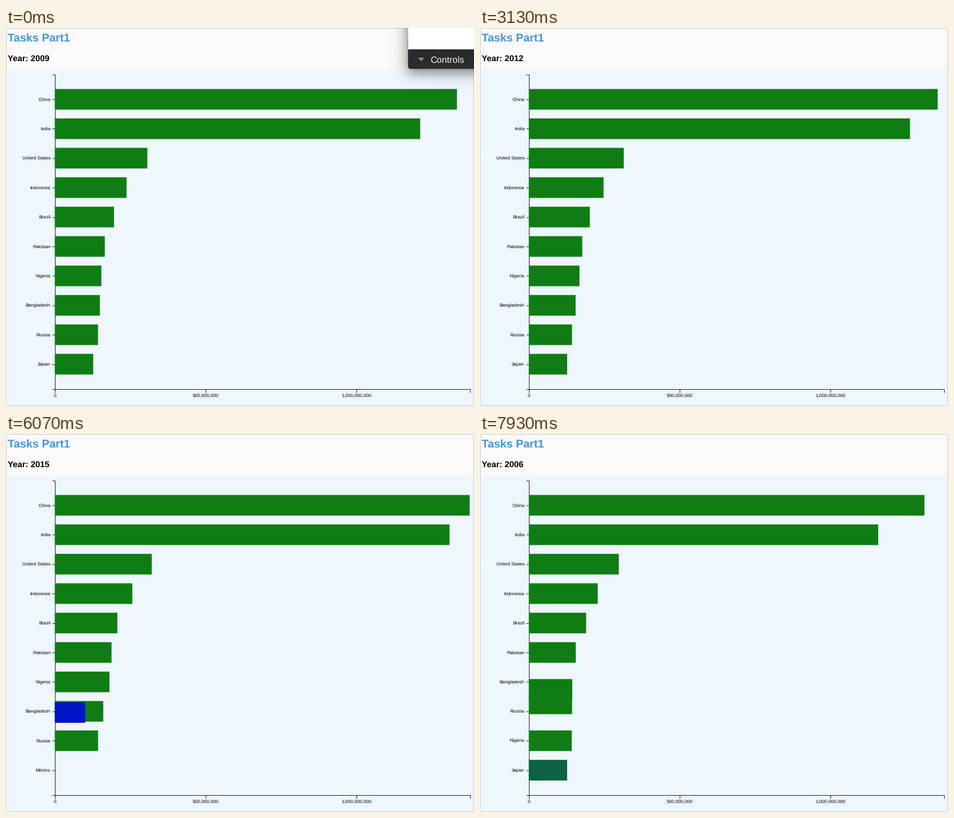
A matplotlib script for the animation above (8000 ms loop, 832 px wide and 673 px high).

```python
import math

import matplotlib.pyplot as plt
import numpy as np
from matplotlib.animation import FuncAnimation
from matplotlib.patches import FancyBboxPatch, Polygon, Rectangle

W, H, DPI = 832, 673, 64
FRAMES, INTERVAL = 200, 40
STEPS_PER_S = 15

X0, SCALE = 86.7, 0.5366          # zero of the x axis, pixels per million
TOP, BOTTOM, RIGHT = 83, 643.4, 825.2
ROW0, PITCH, BAR_H = 108.6, 52.4, 36.7
FIRST_TICK, EASE_S = 0.797, 0.434
FIRST_YEAR, YEARS = 2005, 11

GREEN = np.array([15, 125, 20]) / 255
BLUE = np.array([2, 20, 200]) / 255
INK = "#1c1c1c"

# millions of people in 2005, 2010 and 2015
PEOPLE = {
    "China": (1305.6, 1341.0, 1376.05),
    "India": (1144.3, 1231.0, 1311.05),
    "United States": (296.1, 309.9, 321.8),
    "Indonesia": (226.3, 241.6, 257.6),
    "Brazil": (188.5, 198.6, 207.8),
    "Pakistan": (153.4, 170.0, 188.9),
    "Nigeria": (139.6, 159.4, 182.2),
    "Bangladesh": (142.9, 151.6, 161.0),
    "Russia": (143.6, 143.2, 143.5),
    "Japan": (127.0, 127.3, 126.6),
    "Mexico": (108.5, 118.6, 127.0),
}


def people(name, year):
    a, b, c = PEOPLE[name]
    s = (year - 2010) / 5
    return b + s * (c - a) / 2 + s * s * (a + c - 2 * b) / 2


def ranking(year):
    return sorted(PEOPLE, key=lambda name: -people(name, year))[:10]


def year_before(year):
    return FIRST_YEAR + (year - FIRST_YEAR - 1) % YEARS


def bounce(u):
    k = 7.5625
    if u < 4 / 11:
        return k * u * u
    if u < 8 / 11:
        return k * (u - 6 / 11) ** 2 + 0.75
    if u < 10 / 11:
        return k * (u - 9 / 11) ** 2 + 0.9375
    return k * (u - 21 / 22) ** 2 + 0.984375


def row_y(row):
    return ROW0 + PITCH * row


plt.rcParams["font.family"] = "Liberation Sans"
plt.rcParams["text.hinting"] = "none"

fig = plt.figure(figsize=(W / DPI, H / DPI), dpi=DPI, facecolor="#fbfaf8")
ax = fig.add_axes([0, 0, 1, 1])


def pt(px):
    return px * 72 / DPI


def label(x, y, text, px, color="black", **kw):
    return ax.text(x, y, text, fontsize=pt(px), color=color,
                   va="baseline", **kw)


def line(xs, ys, color=INK):
    ax.plot(xs, ys, color=color, lw=pt(1), solid_capstyle="butt",
            solid_joinstyle="miter", zorder=2)


def box(x, y, w, h, color, z, **kw):
    return ax.add_patch(Rectangle((x, y), w, h, fc=color, lw=0, zorder=z, **kw))


# page
box(3, 74, W - 3, H - 74, "#eef6fe", 0)
ax.add_patch(FancyBboxPatch((0.5, 0.5), W - 1, H - 1, fc="none", ec="#c6c8ca",
                            boxstyle="round,pad=0,rounding_size=4",
                            lw=pt(1), zorder=1))
label(2.8, 24.2, "Tasks Part1", 20, "#4394db", weight="bold")
year_text = label(2.8, 59, "", 15, weight="bold")

# axes
line([81.5, X0, X0, 81.5], [TOP, TOP, BOTTOM, BOTTOM])
line([X0, X0, RIGHT, RIGHT], [648.5, BOTTOM, BOTTOM, 648.5])
for value in (0, 500, 1000):
    x = X0 + value * SCALE
    line([x, x], [BOTTOM, 648.5])
    label(x, 656.5, f"{value * 10**6:,}", 8.35, ha="center")
row_texts = []
for row in range(10):
    y = row_y(row) + BAR_H / 2
    line([81.5, X0], [y, y])
    row_texts.append(label(79, y + 2.6, "", 8.35, ha="right"))

bars = [box(X0, 0, 0, BAR_H, GREEN, 3, snap=False) for _ in range(10)]


def make_panel():
    def edge(d):
        return (1 + np.tanh(d / 14)) / 2

    xs, ys = np.arange(W) + 0.5, np.arange(H) + 0.5
    shade = np.zeros((H, W, 4))
    shade[..., 3] = 0.5 * np.outer(edge(80 - ys), edge(xs - 713))
    return [
        ax.imshow(shade, extent=(0, W, H, 0), aspect="auto", zorder=6),
        ax.add_patch(FancyBboxPatch((714.7, 20), 140, 52.8, fc="#2b2a2d", lw=0,
                                    boxstyle="round,pad=0,rounding_size=5",
                                    zorder=7)),
        box(714.7, -1, 120, 39, "white", 8),
        ax.add_patch(Polygon([(732.5, 53), (743.5, 53), (738, 59)],
                             fc="#8f8e91", lw=0, zorder=8)),
        label(754.6, 62.2, "Controls", 16.3, "#f2f2f2", zorder=8),
    ]


panel = make_panel()
ax.set_xlim(0, W)
ax.set_ylim(H, 0)
ax.axis("off")


def draw(n):
    step = round(n * INTERVAL * STEPS_PER_S / 1000)
    t = step / STEPS_PER_S
    turn = math.floor(t - FIRST_TICK)
    p = bounce(min(1, (t - FIRST_TICK - turn) / EASE_S))

    year = FIRST_YEAR + (turn + 5) % YEARS
    last = year_before(year)
    now, old, older = (ranking(y) for y in (year, last, year_before(last)))

    year_text.set_text(f"Year: {year}")
    for row, (name, bar, text) in enumerate(zip(now, bars, row_texts)):
        new = name not in old
        y_from = TOP if new else row_y(old.index(name))
        w_from = 0 if new else people(name, last)
        bar.set_y(y_from + p * (row_y(row) - y_from))
        bar.set_width(SCALE * (w_from + p * (people(name, year) - w_from)))
        if new:
            color = BLUE
        elif name not in older:
            color = BLUE + p * (GREEN - BLUE)
        else:
            color = GREEN
        bar.set_facecolor(color)
        bar.set_zorder(4 if new else 3)
        text.set_text(name)
    for part in panel:
        part.set_visible(step == 0)
    return []


anim = FuncAnimation(fig, draw, frames=FRAMES, interval=INTERVAL,
                     init_func=lambda: draw(0), repeat=True, repeat_delay=0)
plt.show()
```
